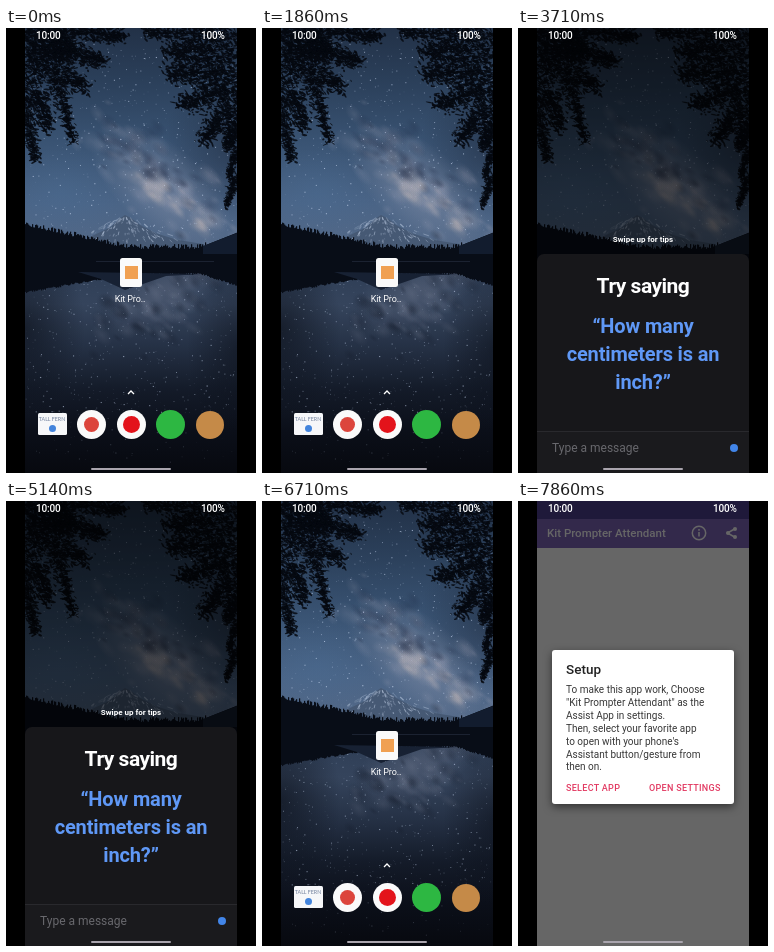
Write an HTML page with a canvas that moves like this. It is 250 by 445 pixels and loops after 8000 ms.

```html
<!DOCTYPE html>
<html lang="en">
<head>
<meta charset="utf-8">
<title>Phone demo</title>
<style>
html, body { margin: 0; width: 100%; height: 100%; overflow: hidden; background: #000; }
body { position: relative; font-family: Roboto, sans-serif; color: #fff; }
div, p, canvas, svg { position: absolute; margin: 0; box-sizing: border-box; }
p { line-height: 20px; white-space: nowrap; }
.mid { left: 0; width: 212px; text-align: center; }
#phone { left: 19px; top: 0; width: 212px; height: 445px; overflow: hidden; }
.fill { left: 0; top: 0; width: 212px; height: 445px; }
.dot { border-radius: 50%; }
#dim { background: #000; }
#tips { top: 202px; font-size: 8px; font-weight: 700; }
#panel { left: 0; top: 226px; width: 212px; height: 219px; border-radius: 7px 7px 0 0; background: #17171a; }
#panel .lead { top: 22px; font-size: 21px; font-weight: 700; letter-spacing: -.5px; }
#panel .quote { top: 58px; font-size: 20px; font-weight: 700; line-height: 28px; letter-spacing: -.15px; color: #5f98f6; }
#bar { left: 0; top: 177px; width: 212px; height: 42px; border-top: 1px solid #29292d; background: #1a1a1d; }
.touch { width: 14px; height: 14px; border-radius: 50%; }
#swipe { left: 101px; top: 289px; background: radial-gradient(#fff 40%, #d5d8e0 60%, #a5adbb); }
#tap { left: 96px; top: 242px; background: #fafafc; border: 1px solid #dcdce0; }
#window { background: linear-gradient(#7b72c2 5%, #fbf9fd 5%); border-radius: 4px; }
#app { background: #fff; }
#app .status { left: 0; top: 0; width: 212px; height: 18px; background: #4f3f92; }
#app .header { left: 0; top: 18px; width: 212px; height: 29px; background: #8068bd; }
#app .title { left: 10px; top: 22px; font-size: 11.5px; font-weight: 500; }
#scrim { background: rgba(0, 0, 0, .6); }
#dialog { left: 15px; top: 149px; width: 182px; height: 154px; border-radius: 3px; background: #fff; color: #383838; box-shadow: 0 3px 9px rgba(0, 0, 0, .5); }
#dialog p { left: 14px; }
#dialog .head { top: 9px; font-size: 13.5px; font-weight: 500; color: #222; }
#dialog .copy { top: 34px; font-size: 10px; line-height: 12.9px; }
#dialog .act { top: 128px; font-size: 9px; font-weight: 500; letter-spacing: .3px; color: #e23a62; }
.clock { top: -2px; font-size: 10px; font-weight: 500; letter-spacing: -.2px; }
#pill { left: 66px; top: 439.5px; width: 80px; height: 2px; border-radius: 1px; background: #a9a4ad; }
</style>
</head>
<body>
<div id="phone">
  <canvas id="wall" width="212" height="445"></canvas>
  <div id="home" class="fill">
    <p class="mid" style="top:260.5px;left:-1px;font-size:9px;letter-spacing:-.1px">Kit Pro..</p>
    <svg class="fill" viewBox="19 0 212 445">
      <path d="M122 366l3-3 3 3" fill="none" stroke="#fff" stroke-width="1.3"/>
    </svg>
  </div>
  <div id="dim" class="fill"></div>
  <p id="tips" class="mid">Swipe up for tips</p>
  <div id="panel">
    <p class="mid lead">Try saying</p>
    <p class="mid quote">“How many<br>centimeters is an<br>inch?”</p>
    <div id="bar">
      <p style="left:15px;top:6px;font-size:12px;color:#68686d">Type a message</p>
      <div class="dot" style="left:193px;top:12px;width:8px;height:8px;background:#4285e8"></div>
    </div>
  </div>
  <div id="swipe" class="touch"></div>
  <div id="window"></div>
  <div id="tap" class="touch"></div>
  <div id="app" class="fill">
    <div class="status"></div>
    <div class="header"></div>
    <p class="title">Kit Prompter Attendant</p>
    <svg class="fill" viewBox="19 0 212 445" fill="none" stroke="#fff" stroke-width="1.5">
      <circle cx="181" cy="32" r="6.7"/>
      <path d="M181 28v1.7M181 31v4.6M216.5 28l-7 4 7 4"/>
      <g fill="#fff" stroke="none">
        <circle cx="217" cy="28" r="2"/><circle cx="210" cy="32" r="2"/><circle cx="217" cy="36" r="2"/>
      </g>
    </svg>
  </div>
  <div id="scrim" class="fill"></div>
  <div id="dialog">
    <p class="head">Setup</p>
    <p class="copy">To make this app work, Choose<br>"Kit Prompter Attendant" as the<br>Assist App in settings.<br>Then, select your favorite app<br>to open with your phone's<br>Assistant button/gesture from<br>then on.</p>
    <p class="act">SELECT APP</p>
    <p class="act" style="left:97px">OPEN SETTINGS</p>
  </div>
  <p class="clock" style="left:11px">10:00</p>
  <p class="clock" style="left:176px">100%</p>
  <div id="pill"></div>
</div>
<script>
const $ = id => document.getElementById(id);
const LOOP = 8000, STEP = LOOP / 56;

let seed = 11;
const rand = (lo = 0, hi = 1) => {
  seed = (seed * 1664525 + 1013904223) % 4294967296;
  return lo + (hi - lo) * seed / 4294967296;
};
const spreadRand = reach => (rand() + rand() + rand() - 1.5) * reach;

// Launcher icons
function shape(x, y, w, h, color, radius) {
  const el = document.createElement('div');
  el.style.cssText = `left:${x - 19 - w / 2}px;top:${y - h / 2}px;width:${w}px;height:${h}px;background:${color};border-radius:${radius}`;
  $('home').append(el);
  return el;
}
const disc = (x, y, r, color) => shape(x, y, 2 * r, 2 * r, color, '50%');
shape(125, 244, 21.5, 29, '#fafafa', '2.5px');
shape(125, 244, 13, 13, '#f0a052', '0');
const card = shape(46, 396, 29, 21.5, '#f6f7f9', '1.5px');
card.innerHTML = '<p style="left:0;top:-4px;width:29px;text-align:center;font:5.3px/20px Lato,sans-serif;color:#71809c">TALL FERN</p>';
disc(46, 400.5, 3.5, '#4384dc');
disc(85.5, 396.5, 14.5, '#fafafa');
disc(85.5, 396.5, 7.5, '#dc453c');
disc(125, 396.5, 14.5, '#fafafa');
disc(125, 396.5, 8.5, '#e3131b');
disc(164.5, 396.5, 14.5, '#2db742');
disc(203.5, 396.5, 14, '#c58a48');

// Night lake wallpaper
const g = $('wall').getContext('2d');
g.translate(-19, 0);

function gradient(top, bottom, colors) {
  const fill = g.createLinearGradient(0, top, 0, bottom);
  colors.forEach((c, i) => fill.addColorStop(i / (colors.length - 1), c));
  g.fillStyle = fill;
  g.fillRect(19, top, 212, bottom - top);
}
function glow(x, y, rx, ry, tilt, rgb, alpha) {
  g.save();
  g.translate(x, y);
  g.rotate(tilt);
  g.scale(rx, ry);
  const fill = g.createRadialGradient(0, 0, 0, 0, 0, 1);
  fill.addColorStop(0, `rgba(${rgb},${alpha})`);
  fill.addColorStop(1, `rgba(${rgb},0)`);
  g.fillStyle = fill;
  g.fillRect(-1, -1, 2, 2);
  g.restore();
}
// Soft patches scattered around a line
function clouds(count, [x0, y0], [x1, y1], reach, rgb, alpha) {
  for (let i = 0; i < count; i++) {
    const k = rand(), size = rand(5, 15);
    glow(x0 + (x1 - x0) * k + spreadRand(reach), y0 + (y1 - y0) * k + spreadRand(reach),
      size, size * rand(.4, .8), rand(.3, 1), rgb, alpha);
  }
}
function stars(count, top, bottom, strength) {
  for (let i = 0; i < count; i++) {
    const size = rand(.4, 1.2);
    g.fillStyle = `rgba(205,220,245,${rand(.1, strength)})`;
    g.fillRect(rand(19, 231), rand(top, bottom), size, size);
  }
}
function poly(points, color) {
  g.fillStyle = color;
  g.fill(new Path2D('M' + points + 'Z'));
}
const ridge = x => Math.min(219, 196 + .22 * (x - 19), 218 - .4 * (x - 197));

gradient(0, 234, ['#223147', '#2c415c', '#3a5474', '#4a6486', '#566a88']);
glow(231, 120, 75, 75, 0, '28,38,56', .55);
glow(55, 165, 60, 45, 0, '75,110,150', .35);
glow(155, 158, 85, 42, .7, '160,165,185', .45);
clouds(70, [90, 98], [205, 195], 32, '190,185,200', .13);
clouds(34, [135, 145], [205, 195], 16, '225,205,195', .17);
clouds(40, [105, 100], [200, 172], 24, '28,40,66', .26);
stars(650, 0, 212, .7);
poly('72 222L84 209 105 199 113 191 119 187 125 190 134 197 152 206 172 212 197 216 205 222', '#465974');
for (let i = 0; i < 110; i++) {
  const k = rand(), side = rand(-1, 1);
  const x = 119 + side * (4 + 55 * k), y = 189 + 24 * k;
  g.strokeStyle = `rgba(180,195,218,${rand(.2, .7)})`;
  g.lineWidth = rand(.5, 1.3);
  g.beginPath();
  g.moveTo(x, y);
  g.lineTo(x + side * rand(2, 6), y + rand(1, 4));
  g.stroke();
}

gradient(234, 445, ['#2d3d55', '#35445c', '#253145', '#141b29', '#0b0f19', '#07090f']);
glow(155, 262, 70, 36, -.5, '120,128,150', .35);
clouds(40, [200, 255], [110, 300], 34, '150,155,175', .12);
clouds(30, [200, 250], [90, 310], 40, '18,25,40', .28);
glow(19, 300, 60, 90, 0, '9,13,22', .6);
glow(231, 320, 50, 90, 0, '9,13,22', .5);
stars(520, 242, 385, .6);
stars(60, 385, 435, .25);

g.fillStyle = '#080d17';
for (let x = 19; x < 231; x++) {
  const top = ridge(x) + (x < 200 ? rand(-3, 2) : 0);
  g.fillRect(x, top, 1.2, 234 - top);
  g.fillRect(x, 234, 1.2, (234 - ridge(x)) * .8 + rand(-1, 1));
}
poly('72 244L95 251 119 262 134 257 160 248 197 246', '#172133');
poly('231 205L197 218 197 226 231 226', '#121c2e');
g.fillStyle = 'rgba(90,105,130,.3)';
g.fillRect(90, 233, 118, .8);

// Each branch: start, end, spread of its leaves
const branches = [
  [19, 4, 60, 4, 16], [19, 22, 66, 22, 16], [60, 2, 118, 8, 9], [50, 20, 98, 34, 10],
  [24, 34, 80, 58, 12], [50, 50, 67, 112, 7], [20, 46, 44, 100, 11], [19, 76, 30, 132, 7],
  [231, 6, 140, 5, 11], [231, 20, 162, 26, 16], [231, 42, 162, 46, 13], [231, 58, 178, 76, 14],
  [231, 74, 196, 112, 11], [231, 96, 222, 118, 8], [231, 122, 223, 150, 4], [231, 148, 220, 178, 4]
];
g.lineWidth = 1;
for (const [x0, y0, x1, y1, spread] of branches) {
  g.strokeStyle = g.fillStyle = 'rgba(6,9,16,.85)';
  g.beginPath();
  g.moveTo(x0, y0);
  g.lineTo(x1, y1);
  g.stroke();
  for (let i = 0; i < 34 * spread; i++) {
    const k = rand(), reach = spread * (1.4 - .7 * k);
    g.beginPath();
    g.ellipse(x0 + (x1 - x0) * k + spreadRand(reach), y0 + (y1 - y0) * k + spreadRand(reach),
      rand(.8, 3.4), rand(.4, 1.1), rand(-.6, 1.3), 0, 7);
    g.fill();
  }
}

// Timeline: [ms, styles] rows
const tracks = [];
function track(id, rows) {
  const frames = [[0, rows[0][1]], ...rows, [LOOP, rows[rows.length - 1][1]]]
    .map(([ms, style]) => ({ offset: ms / LOOP, ...style }));
  const animation = $(id).animate(frames, { duration: LOOP, fill: 'both' });
  animation.pause();
  tracks.push(animation);
}
const fade = (id, rows) => track(id, rows.map(([ms, opacity]) => [ms, { opacity }]));
const slide = (y, opacity = 1) => ({ transform: `translateY(${y}px)`, opacity });
const box = (left, top, width, height, opacity) =>
  ({ left: left + 'px', top: top + 'px', width: width + 'px', height: height + 'px', opacity });

track('home', [[7430, slide(0)], [7570, slide(-12.5, .82)], [7700, slide(-25, 0)]]);
fade('dim', [[2860, 0], [3000, .12], [3400, .58], [5290, .58], [5570, 0]]);
fade('tips', [[3290, 0], [3430, 1], [5290, 1], [5430, 0]]);
track('panel', [[2990, slide(219)], [3140, slide(120)], [3290, slide(24)], [3420, slide(0)],
  [5290, slide(0)], [5430, slide(90)], [5570, slide(219)]]);
track('swipe', [[2700, slide(140, 0)], [2720, slide(125, .8)], [2860, slide(55)], [2990, slide(0)],
  [3020, slide(0)], [3130, slide(-12, 0)]]);
fade('tap', [[7400, 0], [7425, 1], [7600, 1], [7700, 0]]);
track('window', [[7430, box(95, 229, 22, 29, 0)], [7500, box(88, 214, 38, 52, 1)], [7568, box(71.5, 192.5, 69, 94.5, 1)],
  [7575, box(71.5, 192.5, 69, 94.5, 1)], [7700, box(0, 0, 212, 445, 1)]]);
fade('app', [[7650, 0], [7700, 1]]);
fade('scrim', [[7700, 0], [7850, 1]]);
fade('dialog', [[7715, 0], [7850, 1]]);

const start = performance.now();
function tick() {
  const t = (performance.now() - start + 5) % LOOP;
  const shown = Math.floor(t / STEP) * STEP;
  for (const animation of tracks) animation.currentTime = shown;
  requestAnimationFrame(tick);
}
tick();
</script>
</body>
</html>
```
